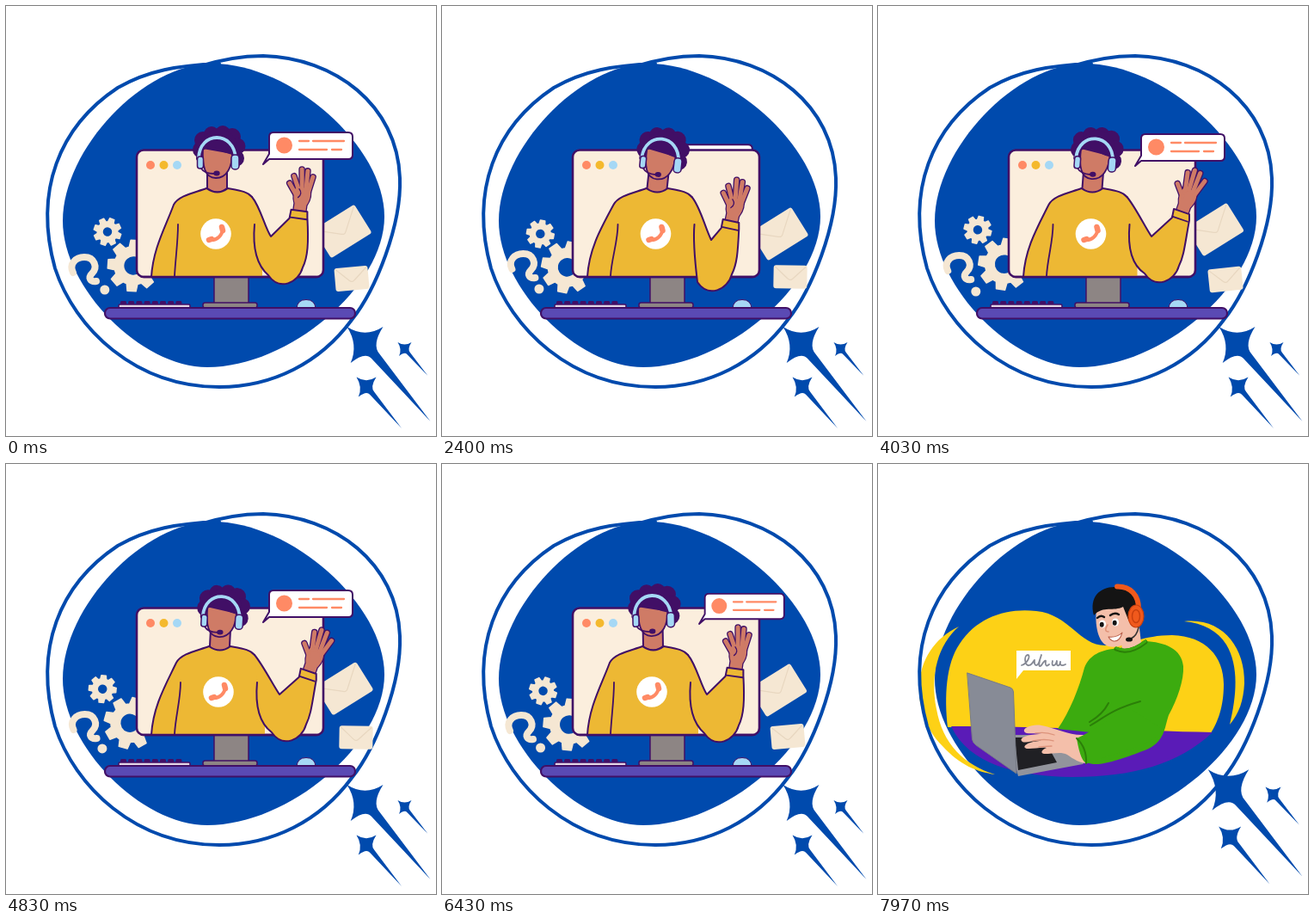
Animation, 500 px wide and 500 px high, one loop 8 s. Source, as an HTML page with a canvas:

```html
<!DOCTYPE html>
<html lang="en">
<head>
<meta charset="utf-8">
<title>Support desk</title>
<style>
html, body { margin: 0; height: 100%; overflow: hidden; background: #fff; }
canvas { display: block; width: 100vw; height: 100vh; }
</style>
</head>
<body>
<canvas id="stage" width="500" height="500"></canvas>
<script>
const ctx = document.getElementById('stage').getContext('2d');
const LOOP = 8000, SWITCH = 6730, PERIOD = 3365, TAU = Math.PI * 2;
const BLUE = '#004aad', INK = '#410f66', CREAM = '#fbeedd', PAPER = '#f5e7d3', GOLD = '#edb834', SKIN = '#cf7b66',
  CORAL = '#ff8a65', SKY = '#a5d8f5', YELLOW = '#fdd116', GREEN = '#3cab0f', LEAF = '#2b7f08',
  PALE = '#f4bfaa', ORANGE = '#f0591c', GREY = '#8d8584', BLACK = '#141414';
ctx.lineCap = ctx.lineJoin = 'round';

function draw(d, fill, stroke, width = 2) {
  const path = new Path2D(d);
  if (fill) { ctx.fillStyle = fill; ctx.fill(path, 'evenodd'); }
  if (stroke) { ctx.strokeStyle = stroke; ctx.lineWidth = width; ctx.stroke(path); }
}
function oval(x, y, rx, fill, ry = rx, stroke, width) {
  draw(`M${x - rx} ${y}a${rx} ${ry} 0 1 1 ${2 * rx} 0a${rx} ${ry} 0 1 1 ${-2 * rx} 0Z`, fill, stroke, width);
}
function box(x, y, w, h, r, fill, stroke, width = 2) {
  ctx.beginPath();
  ctx.roundRect(x, y, w, h, r);
  if (fill) { ctx.fillStyle = fill; ctx.fill(); }
  if (stroke) { ctx.strokeStyle = stroke; ctx.lineWidth = width; ctx.stroke(); }
}
function placed(x, y, degrees, scale, paint) {
  ctx.save();
  ctx.translate(x, y);
  ctx.rotate(degrees * TAU / 360);
  ctx.scale(scale, scale);
  paint();
  ctx.restore();
}
const around = (x, y, degrees, paint) =>
  placed(x, y, degrees, 1, () => { ctx.translate(-x, -y); paint(); });

// Periodic cubic interpolation that never overshoots its knots.
function track(times, values, t) {
  const n = times.length;
  const T = k => times[(k + n) % n] + PERIOD * Math.floor(k / n);
  const V = k => values[(k + n) % n];
  const slope = k => (V(k + 1) - V(k)) / (T(k + 1) - T(k));
  const tangent = k => {
    const a = slope(k - 1), b = slope(k);
    return a * b <= 0 ? 0 : 2 * a * b / (a + b);
  };
  let i = n - 1;
  while (times[i] > t) i--;
  const h = T(i + 1) - T(i), u = (t - T(i)) / h, v = 1 - u;
  return V(i) * (1 + 2 * u) * v * v + V(i + 1) * u * u * (3 - 2 * u)
    + h * u * v * (tangent(i) * v - tangent(i + 1) * u);
}
const POSES = [0, 665, 1430, 2065, 2400, 3065];
const BUBBLE = [0, 665, 1430, 1750, 2065, 2150, 2400, 2520, 2700, 3065, 3250];

function star(x, y, r, dx, dy) {
  const q = r * .36;
  draw(`M${x - r} ${y - r}Q${x} ${y - q} ${x + r} ${y - r}Q${x + q} ${y} ${x + r * .8} ${y + r * .5}
    L${x + dx} ${y + dy}L${x + r * .35} ${y + r * .75}Q${x} ${y + q} ${x - r * .8} ${y + r}Q${x - q} ${y} ${x - r} ${y - r}Z`, BLUE);
}
function backdrop(second) {
  draw('M240 67C332 67 440 163 440 245C440 326 329 420 234 420C157 420 66 328 66 250C66 166 160 67 240 67Z', BLUE);
  if (second) {
    draw('M94 189C35 217 37 290 75 328C95 350 115 358 136 361C100 350 75 325 68 285C60 245 70 210 94 189Z', YELLOW);
    draw('M356 183C400 178 427 213 426 255C425 275 420 290 409 303C417 270 420 235 405 210C395 194 378 185 356 183Z', YELLOW);
  }
  draw('M222 71C250 62 275 58 299 58C382 60 455 115 458 200C460 255 430 330 402 365C365 415 310 443 248 443C150 443 80 375 57 305C32 215 62 140 130 95C165 75 200 69 248 67', null, BLUE, 4);
  placed(second ? 407.5 : 417.5, second ? 379 : 394, 0, second ? 1.13 : 1, () => {
    star(0, 0, 21, 76, 89);
    star(1.5, 49, 11.5, 41, 48);
    star(46, 5, 8, 27, 31);
  });
}

function gear(x, y, r, hole, turn) {
  placed(x, y, turn, 1, () => {
    const points = [];
    for (let i = 0; i < 8; i++)
      [[-.29, .74], [-.17, 1], [.17, 1], [.29, .74]].forEach(([a, k]) => {
        const angle = i * TAU / 8 + a;
        points.push(`${r * k * Math.cos(angle)} ${r * k * Math.sin(angle)}`);
      });
    draw(`M${points.join('L')}ZM${hole} 0A${hole} ${hole} 0 1 0 ${-hole} 0A${hole} ${hole} 0 1 0 ${hole} 0Z`, PAPER, PAPER, 1.5);
  });
}
function envelope(x, y, w, h, turn) {
  placed(x, y, turn, 1, () => {
    box(-w / 2, -h / 2, w, h, 3, PAPER);
    draw(`M${-w / 2 + 2} ${-h / 2 + 2}L-3 2Q0 5 3 2L${w / 2 - 2} ${-h / 2 + 2}`, null, '#e8d7c0', 1.2);
  });
}
function callout(x, y, scale) {
  if (scale < .01) return;
  placed(x, y, 0, scale, () => {
    draw('M0 0L7 -12V-32Q7 -37 12 -37H99Q104 -37 104 -32V-11Q104 -6 99 -6H7Z', '#fff', INK, 2);
    oval(24.5, -22, 9.5, CORAL);
    draw('M42 -27H53M58 -27H94M42 -17H74M80 -17H91', null, CORAL, 2.3);
  });
}
function hand(x, y, turn, open) {
  const mix = (a, b) => a + (b - a) * open;
  placed(x, y, turn, 1, () => {
    const fingers = [[-6, -20, -16, -33, -16, -32], [-5, -28, -12, -42, -9, -48], [-1, -30, -4, -51, -2, -53],
      [4, -29, 3, -50, 5, -52], [7, -26, 10, -44, 13, -45]]
      .map(([bx, by, cx, cy, ox, oy]) => `M${bx} ${by}L${mix(cx, ox)} ${mix(cy, oy)}`);
    const palm = 'M-7 2V-11C-10 -17 -10 -27 -7 -30H8C12 -22 9 -14 7 -10V2Z';
    draw(palm, SKIN, INK, 2.5);
    fingers.forEach(d => draw(d, null, INK, 7.6));
    draw(palm, SKIN);
    fingers.forEach(d => draw(d, null, SKIN, 5));
    if (open < .5) draw('M-4 -18Q1 -23 -4 -28', null, INK, 1.3);
  });
}
function agentHead() {
  draw('M234 188V212Q246 221 257 212V188Z', SKIN, INK, 2);
  [[227, 167, 10], [229, 156, 10], [239, 149, 9], [252, 148, 9], [263, 152, 10], [269, 163, 9.5],
    [267, 177, 10], [248, 163, 20]].forEach(([x, y, r]) => oval(x, y, r, INK));
  draw('M229 165C228 186 231 200 244 200C257 200 263 187 263 171Z', SKIN, INK, 1.8);
  draw('M226 171C229 167 234 165 239 162C246 168 255 171 264 173L262 156L232 155Z', INK);
  const band = 'M224 177C225 145 265 145 267 177';
  draw(band, null, INK, 6);
  draw(band, null, SKY, 3.8);
  box(222.5, 175, 7, 14, 3, SKY, INK, 1.5);
  box(262, 173, 9, 17, 4, SKY, INK, 1.5);
  draw('M227 189Q231 195 242 195', null, INK, 1.8);
  oval(245, 194.5, 3.7, INK, 2.9);
}
function agent(pose) {
  const s = pose(0, 3.5, 3, 2.5, 4.5, 0);
  const torso = `M169 315C171 282 185 258 ${195 + s} 231C${201 + s} 220 ${220 + s} 217 ${233 + s} 212Q${246 + s} 221 ${258 + s} 212C${274 + s} 215 ${281 + s} 216 ${286 + s} 222`;
  around(246, 212, pose(0, 4.5, 3, 3.5, 6.2, -1), () => { ctx.translate(s, pose(0, 1, 1, 1, 1, 0)); agentHead(); });
  draw(`${torso}L${298 + s} 250V315Z`, GOLD);
  draw(torso, null, INK, 2);
  draw(`M${200 + s} 254C${200 + s} 274 197 294 196 314`, null, INK, 1.8);
  placed(244 + s, 265, 0, 1, () => {
    oval(0, 0, 17.8, '#fff');
    draw('M-7 7C1 8 8 2 8 -7', null, CORAL, 4);
    draw('M-8 7L-5 6M7 -8L8 -4', null, CORAL, 6.5);
  });
  draw('M160 315H361', null, INK, 2.6);

  const cx = pose(341, 353, 352, 334, 336, 341), cy = pose(241, 242, 244, 238, 253, 241);
  const turn = pose(8, 19, 19, 3, 12, 8), a = turn * TAU / 360;
  const kx = pose(308, 318, 318, 317, 313, 308), ky = pose(268, 268, 268, 263, 272, 268);
  const ox = pose(350, 355, 354, 349, 342, 350), ey = pose(322, 320, 321, 321, 330, 322);
  const wx = 9.5 * Math.cos(a), wy = 9.5 * Math.sin(a);
  hand(cx, cy, turn, pose(0, 1, 1, 1, 0, 0));
  draw(`M${286 + s} 222C${296 + s} 234 ${kx - 7} 258 ${kx} ${ky}L${cx - wx - 2} ${cy - wy + 7}L${cx - wx} ${cy - wy - 3}
    L${cx + wx} ${cy + wy - 3}L${cx + wx} ${cy + wy + 4}C${ox + 2} ${cy + 34} ${ox + 1} ${ey - 30} ${ox - 5} ${ey - 18}
    C${ox - 10} ${ey} ${ox - 32} ${ey + 10} ${ox - 45} ${ey - 9}C${290 + s} 300 ${287 + s} 276 ${289 + s} 254`, GOLD, INK, 2);
  placed(cx, cy, turn, 1, () => draw('M-9.5 6H9.5', null, INK, 1.8));
}
function supportScene(time) {
  const t = time % PERIOD, phase = t / PERIOD * TAU;
  const pose = (...values) => track(POSES, values, t);
  const dx = 3 * Math.cos(phase), dy = -2.4 * Math.sin(phase);
  gear(115 + dx, 262.6 + dy, 16, 6, 12 + 2.5 * dx);
  gear(146 + dx * .7, 302 + dy * .8, 30, 11.5, 10 - 2 * dx);
  const sway = -1.8 * Math.cos(2 * phase);
  placed(sway + 1.8, pose(0, -2, -1, -2, -4, 0), 0, 1, () =>
    draw('M78 310C73 300 81 292 91 292C103 292 107 304 100 311C95 316 98 321 105 320', null, PAPER, 8));
  oval(113.3 + dx * .5, pose(330, 332, 331, 329, 329, 330), 5.5, PAPER);
  envelope(pose(391.5, 392, 393.5, 393, 392.5, 391), pose(262, 260, 261, 265, 265, 263), 56, 39, -32);
  envelope(pose(402, 404, 407, 406, 405, 402), pose(317, 318, 318, 316, 315, 317), 39, 27, pose(-5, -6, 1, 0, 1, -5));

  const bubble = values => track(BUBBLE, values, t);
  const callHere = () => callout(
    299 + bubble([0, 0, 0, 0, 5, 5, -39, -45, 0, 0, 0]),
    184 + bubble([0, 2, 0, 0, -17, -21, 13, 30, 2, 2, 0]),
    bubble([1, 1, 1, 1, .97, .97, .97, .9, 0, .95, 1]));
  const behind = t > 2150 && t < 2700;
  if (behind) callHere();

  box(242, 314, 40, 33, 0, GREY, INK, 1.5);
  box(229, 345, 63, 6, 2.5, GREY, INK, 1.5);
  box(152, 167.5, 217, 147.5, 8, CREAM, INK, 2.6);
  [CORAL, '#f4b92d', SKY].forEach((color, i) => oval(168 + i * 15.5, 185, 5, color));
  agent(pose);
  for (let x = 136; x < 208; x += 9.2) box(x - 3, 343, 7, 5, 1.5, INK);
  box(131, 347, 83, 4, 1.5, '#e3d6e6', INK, 1.5);
  draw('M338 351Q339 341.500 349 341.500Q359 341.500 360 351Z', SKY, INK, 1);
  box(115, 351, 291, 12.5, 6, '#5a4ab4', INK, 2.2);
  if (!behind) callHere();
}

function workerHead() {
  draw('M282 194L284 218Q298 221 306 208L303 182Z', PALE);
  draw('M254 168C252 186 255 208 268 212C284 216 301 203 302 180L297 158L262 158Z', PALE);
  draw('M251 176C245 154 259 142 277 143C299 143 309 157 303 176L291 181L285 166C274 172 262 164 251 176Z', BLACK);
  draw('M278 142.500C294 142 303 153 303 168', null, ORANGE, 6);
  oval(300, 177, 9, ORANGE, 13, '#c8400f', 1.2);
  oval(300, 177, 4.5, null, 7.5, '#c8400f', 1.5);
  draw('M303 190Q301 200 294 203', null, '#333', 1.5);
  oval(292, 204, 4, BLACK, 2.6);
  [[261, 186], [276, 184]].forEach(([x, y]) => {
    oval(x, y, 4, '#fff', 4.5);
    oval(x - .8, y + .8, 2.5, BLACK, 3);
  });
  draw('M255 179Q259 175 263 178M270 176Q275 172 280 175', null, BLACK, 2.4);
  draw('M267 187Q262 195 268 195', null, '#df9278', 1.5);
  draw('M268 201Q278 202 284 196Q281 207 274 206Q270 205 268 201Z', '#fff', '#b85d48', 1);
}
function workerScene(time) {
  const beat = (time - 7970) / 800 * TAU, nod = Math.sin(beat), tap = Math.sin(beat * 3);
  draw('M81 306C77 270 79 232 95 209C115 178 150 167 184 171C223 175 234 211 264 211C292 211 308 199 342 199C381 200 402 224 402 256C402 283 395 300 387 313Z', YELLOW);
  draw('M85 305C180 305 300 310 389 312C350 349 296 364 226 364C160 363 106 349 85 305Z', '#5a1bb7');
  const lean = nod * .8;
  draw(`M${281 + lean} 214C258 216 246 222 240 237C234 260 223 288 209 308L247 312L244 347C254 354 286 342 310 333C334 324 333 306 338 292C348 274 356 251 355 235C353 215 334 207 ${310 + lean} 206Z`, GREEN);
  draw('M150 315H204L241 346L238 349L163 363Z', '#92949c');
  draw('M159 318L192 318L208 347L163 356Z', '#202024');
  draw('M104 243L154 260Q157 261 157.500 265L161 360L114 327Q110 324 109.500 320Z', '#878b96', '#777b86', 1);
  around(239, 330, tap * 1.2, () => {
    draw('M240 315C222 316 207 307 190 304C180 302 168 307 170 311C172 315 182 312 190 314C176 314 164 318 167 322C169 326 181 321 190 322C178 322 168 327 171 330C174 333 187 329 196 330C191 332 188 336 193 337C204 337 213 334 220 338C227 343 235 348 244 348Z', PALE);
    draw('M183 313Q195 311 205 315M180 322Q194 319 204 322M187 329L202 328', null, '#dc937c', 1.3);
  });
  draw('M231 319C249 311 270 295 291 283L331 308C320 328 288 332 244 348Q236 349 231 319Z', GREEN);
  draw('M247 304C263 295 270 286 305 276M246 300C258 293 264 286 268 278M231 319Q243 330 242 348', null, LEAF, 2);
  around(294, 212, nod * 2, workerHead);
  draw(`M${277 + lean} 215Q${292 + lean} 222 ${311 + lean} 207`, null, LEAF, 5);
  draw(`M${277 + lean} 214Q${292 + lean} 221 ${311 + lean} 206`, null, GREEN, 3);
  draw('M161 217H224V240H169L161 250Z', '#fff');
  ctx.save();
  ctx.beginPath();
  ctx.rect(161, 217, 5 + 55 * Math.min(1, (time - SWITCH) / 1150), 33);
  ctx.clip();
  draw('M167 234C174 232 178 222 174 222C169 223 171 236 176 234C180 233 181 228 182 228C181 236 186 236 188 228L190 222C187 230 186 238 190 234C193 229 195 228 195 229C194 236 197 235 199 233M203 229C201 236 206 236 208 229C207 236 211 236 212 230C211 236 216 234 218 233', null, '#858894', 1.8);
  ctx.restore();
}

function frame() {
  const time = performance.now() % LOOP, second = time >= SWITCH;
  ctx.clearRect(0, 0, 500, 500);
  backdrop(second);
  (second ? workerScene : supportScene)(time);
  requestAnimationFrame(frame);
}
frame();
</script>
</body>
</html>
```
